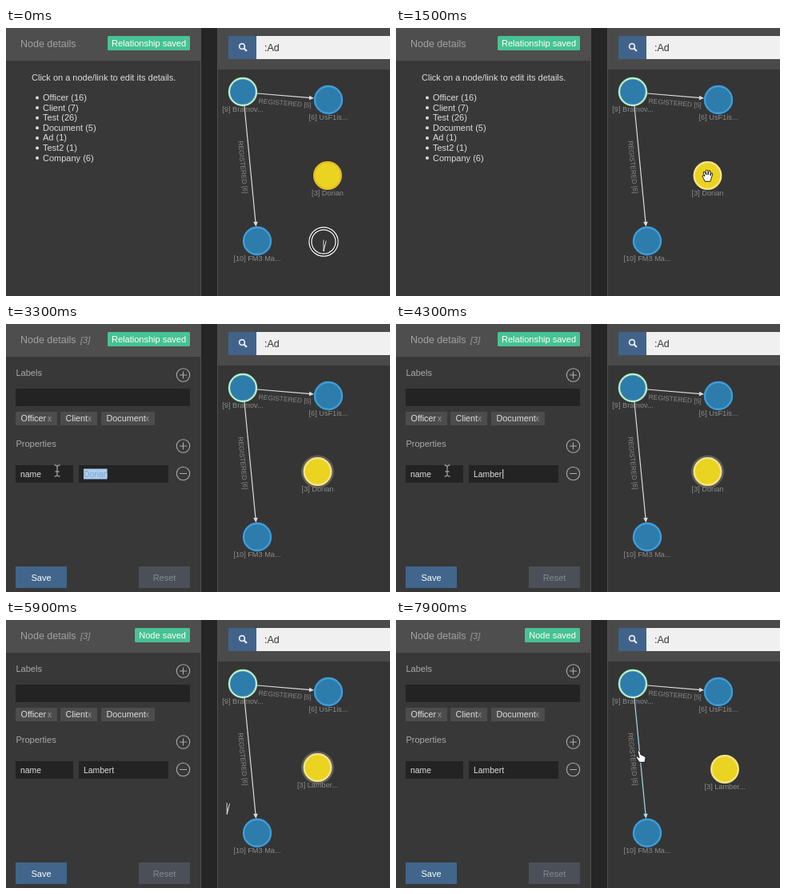
An HTML page for the animation above (8 s loop, 480 by 336 pixels).

```html
<!DOCTYPE html>
<html lang="en">
<head>
<meta charset="utf-8">
<title>Graph editor</title>
<style>
  html, body { margin: 0; width: 100%; height: 100%; overflow: hidden; background: #252525; }
  svg { display: block; width: 480px; height: 336px; font: 11px "Liberation Sans", Arial, sans-serif; fill: #ddd; }
  .mid { text-anchor: middle; }
  .dim { fill: #aaa; }
  .box { fill: #232323; }
  .chip { fill: #4c4c4c; }
  .field { font-size: 10.4px; }
  .label { font-size: 9.2px; fill: #8b8b8b; text-anchor: middle; }
  .rel { font-size: 8.4px; fill: #8b8b8b; text-anchor: middle; }
  .icon { fill: none; stroke: #aaa; stroke-width: 1.1; }
  .cursor path { stroke-linejoin: round; stroke-linecap: round; }
</style>
</head>
<body>
<svg viewBox="0 0 480 336">
  <rect width="243" height="336" fill="#383838"/>
  <rect width="243" height="41" fill="#4e4e4e"/>
  <path d="M243.5 0V336M264.5 0V336" stroke="#505050"/>
  <rect x="265" width="215" height="336" fill="#353535"/>
  <rect x="265" width="215" height="52" fill="#4a4a4a"/>
  <rect x="278" y="10" width="35" height="29" fill="#41638a"/>
  <rect x="313" y="10" width="167" height="29" fill="#f0f0f0"/>
  <g fill="none" stroke="#e8edf2" stroke-width="1.7"><circle cx="295" cy="23" r="3.4"/><path d="M297.5 25.5L301 29" stroke-width="2.2"/></g>
  <text x="323" y="28.5" font-size="12.5" fill="#333">:Ad</text>

  <text x="18" y="24" font-size="12.5" fill="#a2a2a2">Node details</text>
  <rect id="badge" y="10" height="18" rx="1.5" fill="#47c294"/>
  <text id="badgeText" x="225" y="23" text-anchor="end" fill="#fff"></text>

  <g id="summary"><text x="32" y="66">Click on a node/link to edit its details.</text></g>

  <g id="form">
    <text x="93" y="23.5" font-style="italic" fill="#999">[3]</text>
    <text class="dim" x="12.5" y="65">Labels</text>
    <text class="dim" x="12.5" y="154">Properties</text>
    <path class="icon" d="M217 64h9M221.500 59.500v9M217 153h9M221.500 148.500v9M217 187.500h9"/>
    <g class="icon"><circle cx="221.5" cy="64" r="8.2"/><circle cx="221.5" cy="153" r="8.2"/><circle cx="221.5" cy="187.500" r="8.2"/></g>
    <rect class="box" x="12" y="81" width="218" height="22"/>
    <g id="chips"></g>
    <rect class="box" x="12" y="177" width="72" height="22"/>
    <rect class="box" x="91" y="177" width="112" height="22"/>
    <text class="field" x="18" y="191.500">name</text>
    <rect id="selection" y="181.500" height="13" fill="#abcdf0"/>
    <text class="field" id="value" x="97" y="191.500"></text>
    <rect id="caret" y="182" width="1" height="12"/>
    <rect id="save" x="12" y="304" width="64" height="27"/>
    <text class="mid" x="44" y="322" fill="#fff">Save</text>
    <rect x="166" y="304" width="64" height="27" fill="#4b5058"/>
    <text class="mid" x="198" y="322" fill="#858a90">Reset</text>
  </g>

  <g id="graph"></g>
  <g id="moving">
    <circle id="halo" r="20.500" fill="#605e55"/>
    <circle id="disc" r="16.800" fill="#ebd321" stroke-width="2.300"/>
    <text class="label" id="person" y="25"></text>
  </g>

  <g id="pointer">
    <g id="ring" fill="none"><circle id="ringDark" stroke="#111" stroke-width="4.500"/><circle id="ringOut" stroke="#eee" stroke-width="1.400"/><circle id="ringIn" stroke="#eee" stroke-width="1.400"/></g>
    <g class="cursor" id="arrow"><path d="M0-2V12L3-1+9L5.500 14L8 13L5.600 8H10Z" fill="#111" stroke="#eee"/></g>
    <g class="cursor" id="ibeam"><path id="beamBack" d="M-3-6Q0-6 0-3Q0-6 3-6M0-3V5M-3 8Q0 8 0 5Q0 8 3 8M-2 2H2" fill="none" stroke="#999" stroke-width="1.300"/></g>
    <g class="cursor" id="open"><path d="M-3 7L-6 1Q-6-1-4 0L-3 1L-5-4Q-4-6-3-4L-1-1L-2-6Q0-8 1-6L1-1L2-6Q4-7 4-5L4 0L5-3Q7-4 6.500-1L5 4L4 7Z" fill="#fff" stroke="#222"/></g>
    <g class="cursor" id="finger"><path d="M-2 8L-6 2Q-6 0-4 1L-2 3L-4-5Q-3-8-1-5L0-1Q1-2 2 0Q3-1 4 1Q6 0 6 3L5 8Z" fill="#fff" stroke="#222"/></g>
  </g>
</svg>
<script>
const LOOP = 8000;
const el = id => document.getElementById(id);
const set = (id, attrs) => { for (const k in attrs) el(id).setAttribute(k, attrs[k]); };
const show = (id, on) => el(id).style.display = on ? '' : 'none';
const within = (t, a, b) => t >= a && t < b;
const clamp = (v, a, b) => Math.max(a, Math.min(b, v));
const OLD = 'Dorian', NEW = 'Lambert';

// Static lists
['Officer (16)', 'Client (7)', 'Test (26)', 'Document (5)', 'Ad (1)', 'Test2 (1)', 'Company (6)'].forEach((s, i) => {
  const y = 91 + i * 12.6;
  el('summary').innerHTML += `<circle cx="39" cy="${y - 3.5}" r="2"/><text x="46" y="${y}">${s}</text>`;
});
[['Officer', 12, 52], ['Client', 68, 46], ['Document', 119, 67]].forEach(([s, x, w]) => {
  el('chips').innerHTML += `<rect class="chip" x="${x}" y="110" width="${w}" height="17"/>
    <text x="${x + 6.5}" y="122" font-size="10.8">${s}</text><text x="${x + w - 12}" y="122" fill="#999" font-size="10">x</text>`;
});

// Links carry their label just below the line
function link(id, x1, y1, x2, y2, text) {
  const len = Math.hypot(x2 - x1, y2 - y1);
  const angle = Math.atan2(y2 - y1, x2 - x1) * 180 / Math.PI;
  return `<g transform="translate(${x1} ${y1}) rotate(${angle})">
    <g id="${id}" stroke="#ddd" fill="#ddd"><path d="M0 0H${len - 4}" stroke-width="1.2"/><path d="M${len} 0l-6-2.8v5.6z" stroke="none"/></g>
    <text class="rel" x="${len / 2}" y="12">${text}</text></g>`;
}
const node = (x, y, stroke, text) => `<circle cx="${x}" cy="${y}" r="17" fill="#2d7cab" stroke="${stroke}" stroke-width="2.4"/>
  <text class="label" x="${x}" y="${y + 25}">${text}</text>`;
el('graph').innerHTML =
  node(296, 80, '#b5ecc6', '[9] Bramov...') + node(403, 90, '#3d9edb', '[6] UsF1is...') + node(314, 267, '#3d9edb', '[10] FM3 Ma...') +
  link('across', 314, 82, 385, 88, 'REGISTERED [5]') + link('down', 298, 98, 312.5, 249, 'REGISTERED [6]');

// Paths are [time, x, y], eased between stops
const cursorPath = [[200, 397, 268], [800, 402, 185], [1000, 402, 185], [1400, 389, 185], [1900, 389, 185],
  [2450, 123, 180], [2550, 123, 180], [2750, 128, 186], [3050, 64, 183], [4500, 64, 183], [5100, 43, 325], [5500, 43, 325],
  [6150, 390, 186], [6700, 433, 197], [6850, 439, 195], [7150, 411, 189], [7350, 411, 189], [7850, 306, 170]];
const nodePath = [[1000, 402, 185], [1400, 389.5, 185], [6200, 389.5, 185], [6700, 435, 194], [6850, 440, 193], [7150, 411, 187]];
const presses = [[-400, -60], [950, 1300], [1700, 1850], [2750, 3050], [5280, 5400], [6200, 7100]];
const shapes = [[0, 'arrow'], [750, 'open'], [2000, 'arrow'], [2350, 'ibeam'], [4650, 'arrow'], [4980, 'finger'],
  [5600, 'arrow'], [6050, 'finger'], [7400, 'arrow'], [7720, 'finger']];

function along(path, t) {
  const i = path.findIndex(p => p[0] > t);
  if (i < 0) return path[path.length - 1].slice(1);
  if (!i) return path[0].slice(1);
  const [a, b] = [path[i - 1], path[i]];
  const u = (t - a[0]) / (b[0] - a[0]), e = u * u * (3 - 2 * u);
  return [a[1] + (b[1] - a[1]) * e, a[2] + (b[2] - a[2]) * e];
}
const ringRadius = t => Math.max(...presses.map(([a, b]) =>
  t < a ? 0 : 26 * (t < b ? Math.min(1, (t - a) / 100) : Math.max(0, 1 - (t - b) / 200))));

function draw(t) {
  const [cx, cy] = along(cursorPath, t), [nx, ny] = along(nodePath, t);
  const saved = t >= 5500, open = t >= 1900;
  const typed = clamp(Math.floor((t - 3600) / 115), 0, NEW.length);

  set('badge', saved ? { x: 161, width: 69 } : { x: 127, width: 103 });
  el('badgeText').textContent = saved ? 'Node saved' : 'Relationship saved';
  show('summary', !open);
  show('form', open);

  el('value').textContent = typed ? NEW.slice(0, typed) : OLD;
  const left = clamp(cx, 97, 126.5), selecting = within(t, 2750, 3600) || (t >= 3600 && !typed);
  show('selection', selecting && typed === 0);
  set('selection', { x: left, width: 126.5 - left });
  set('value', { fill: selecting && left < 100 ? '#8ba6c4' : '#ddd' });
  show('caret', typed && t < 4700);
  if (open) set('caret', { x: 98 + el('value').getComputedTextLength() });
  set('save', { fill: within(t, 4980, 5600) ? '#34506f' : '#41658b' });

  set('moving', { transform: `translate(${nx} ${ny})` });
  show('halo', within(t, 1900, 6050));
  set('disc', { stroke: t < 750 ? '#e4bd25' : '#f5e58a' });
  el('person').textContent = saved ? `[3] ${NEW.slice(0, 6)}...` : `[3] ${OLD}`;
  const lit = t >= 7720 ? '#a5dcec' : '#ddd';
  set('down', { stroke: lit, fill: lit });

  const r = ringRadius(t);
  set('pointer', { transform: `translate(${cx} ${cy})` });
  show('ring', r > 3);
  set('ringDark', { r: Math.max(0, r - 1.5) });
  set('ringOut', { r: Math.max(0, r) });
  set('ringIn', { r: Math.max(0, r - 3) });
  const shape = shapes.filter(s => s[0] <= t).pop()[1];
  for (const id of ['arrow', 'ibeam', 'open', 'finger']) show(id, id === shape);
}

const start = performance.now();
function tick() {
  draw((performance.now() - start) % LOOP);
  requestAnimationFrame(tick);
}
tick();
</script>
</body>
</html>
```
